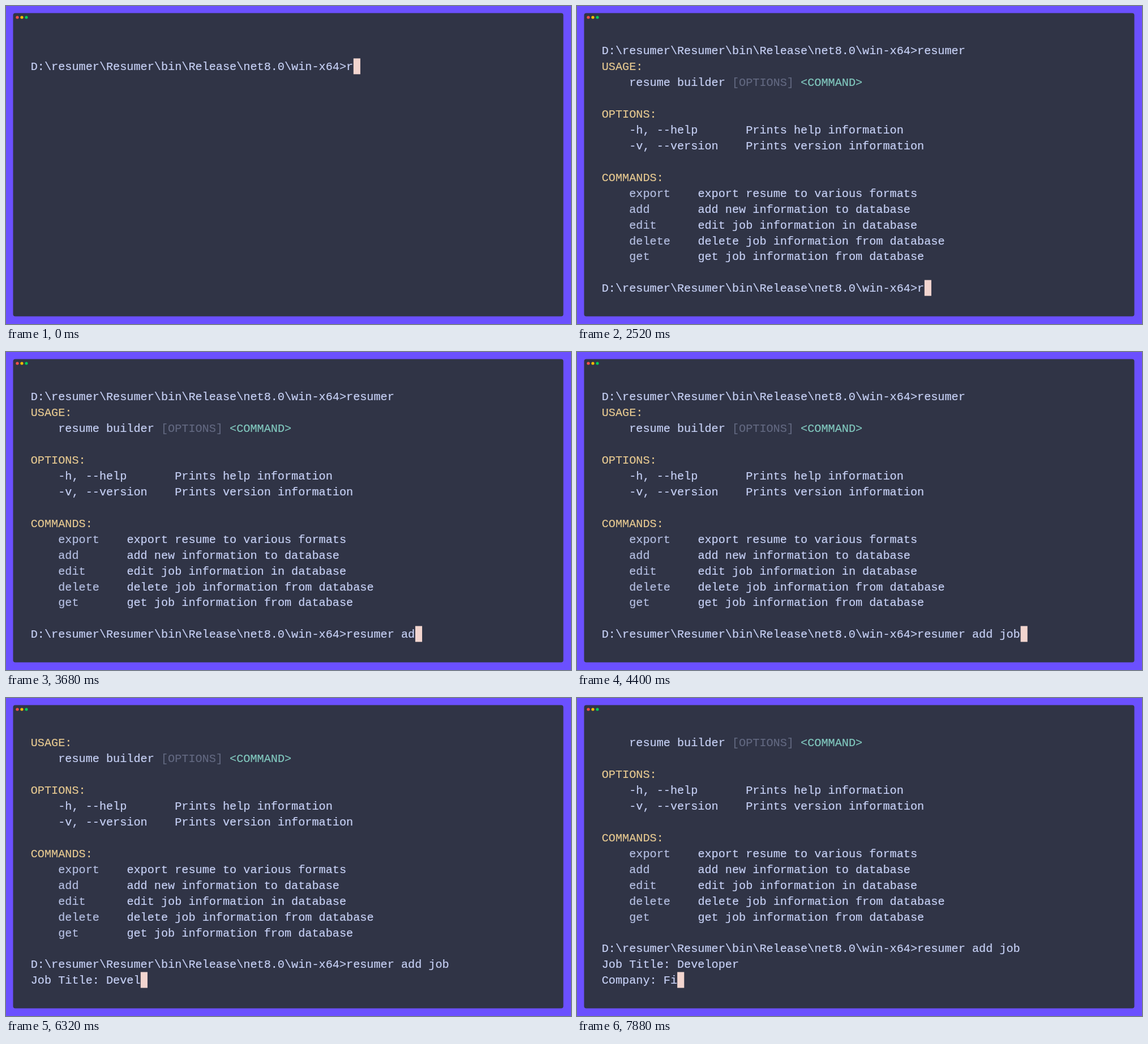
These frames come from a looping animation (998 px wide and 561 px high, 8000 ms). An HTML page:

```html
<!DOCTYPE html>
<html lang="en">
<head>
<meta charset="utf-8">
<title>Terminal</title>
<style>
  html, body { margin: 0; width: 100%; height: 100%; overflow: hidden; background: #6b50ff; }
  svg { position: absolute; left: 0; top: 0; }
  #screen {
    position: absolute; left: 43.75px; top: 66.3px; margin: 0;
    font: 20.21px/27.93px "Liberation Mono", monospace; color: #c6d0f5;
    -webkit-text-stroke: 0.2px;
  }
  .head { color: #e5c890; }
  .dim { color: #626880; }
  .arg { color: #81c8be; }
  .name { color: #b5bfe2; }
</style>
</head>
<body>
<svg width="998" height="561">
  <rect x="12.5" y="12.5" width="972" height="535" rx="4" fill="#303446"/>
  <circle cx="20" cy="20" r="2.6" fill="#ff4f4d"/>
  <circle cx="28" cy="20" r="2.6" fill="#febb00"/>
  <circle cx="36" cy="20" r="2.6" fill="#00cc5a"/>
  <rect id="cursor" width="12.13" height="27.93" fill="#f2d5cf"/>
</svg>
<pre id="screen"></pre>
<script>
const LOOP = 8000, ROWS = 16, CELL = 12.128, LINE = 27.93, LEFT = 43.75, TOP = 64.5;
const screenEl = document.getElementById('screen');
const cursorEl = document.getElementById('cursor');

const span = (cls, text) => `<span class="${cls}">${text}</span>`;
const head = text => span('head', text);
const command = (name, info) => '    ' + span('name', name.padEnd(10)) + info;

const prompt = String.raw`D:\resumer\Resumer\bin\Release\net8.0\win-x64>`;
const help = [
  head('USAGE:'),
  `    resume builder ${span('dim', '[OPTIONS]')} ${span('arg', '&lt;COMMAND&gt;')}`,
  '', head('OPTIONS:'),
  '    -h, --help       Prints help information',
  '    -v, --version    Prints version information',
  '', head('COMMANDS:'),
  command('export', 'export resume to various formats'),
  command('add', 'add new information to database'),
  command('edit', 'edit job information in database'),
  command('delete', 'delete job information from database'),
  command('get', 'get job information from database'),
  '', ''
].join('\n');

// Each event: time, text to append, cursor visible
const type = (text, ...times) => times.map((t, i) => [t, text[i], true]);
const blink = (...times) => times.map((t, i) => [t, '', i % 2 === 1]);
const events = [
  [0, '\n' + prompt + 'r', true],
  ...type('esumer', 200, 360, 520, 680, 840, 1000),
  [1200, '', false],
  [1320, '\n', true],
  ...blink(1600, 1840, 2160),
  [2520, help + prompt + 'r', true],
  ...type('esumer add job', 2560, 2680, 2800, 2960, 3120, 3240, 3360, 3520,
    3680, 3840, 3960, 4120, 4240, 4400),
  [4560, '\n', true],
  ...blink(4880),
  [4960, 'Job Title: ', true],
  ...blink(5320, 5640),
  ...type('Developer', 5720, 5880, 6000, 6160, 6320, 6480, 6600, 6760, 6880),
  [7080, '\nCompany: ', true],
  ...blink(7400, 7720),
  ...type('Fi', 7760, 7880)
];

let shown = 0;
function draw(time) {
  const past = events.filter(e => e[0] <= time);
  if (past.length === shown) return;
  shown = past.length;
  const view = past.map(e => e[1]).join('').split('\n').slice(-ROWS);
  const row = view.length - 1;
  screenEl.innerHTML = view.join('\n');
  cursorEl.setAttribute('x', LEFT + view[row].length * CELL);
  cursorEl.setAttribute('y', TOP + row * LINE);
  cursorEl.style.visibility = past[shown - 1][2] ? 'visible' : 'hidden';
}

const start = performance.now();
function tick() {
  draw((performance.now() - start) % LOOP);
  requestAnimationFrame(tick);
}
draw(0);
requestAnimationFrame(tick);
</script>
</body>
</html>
```
